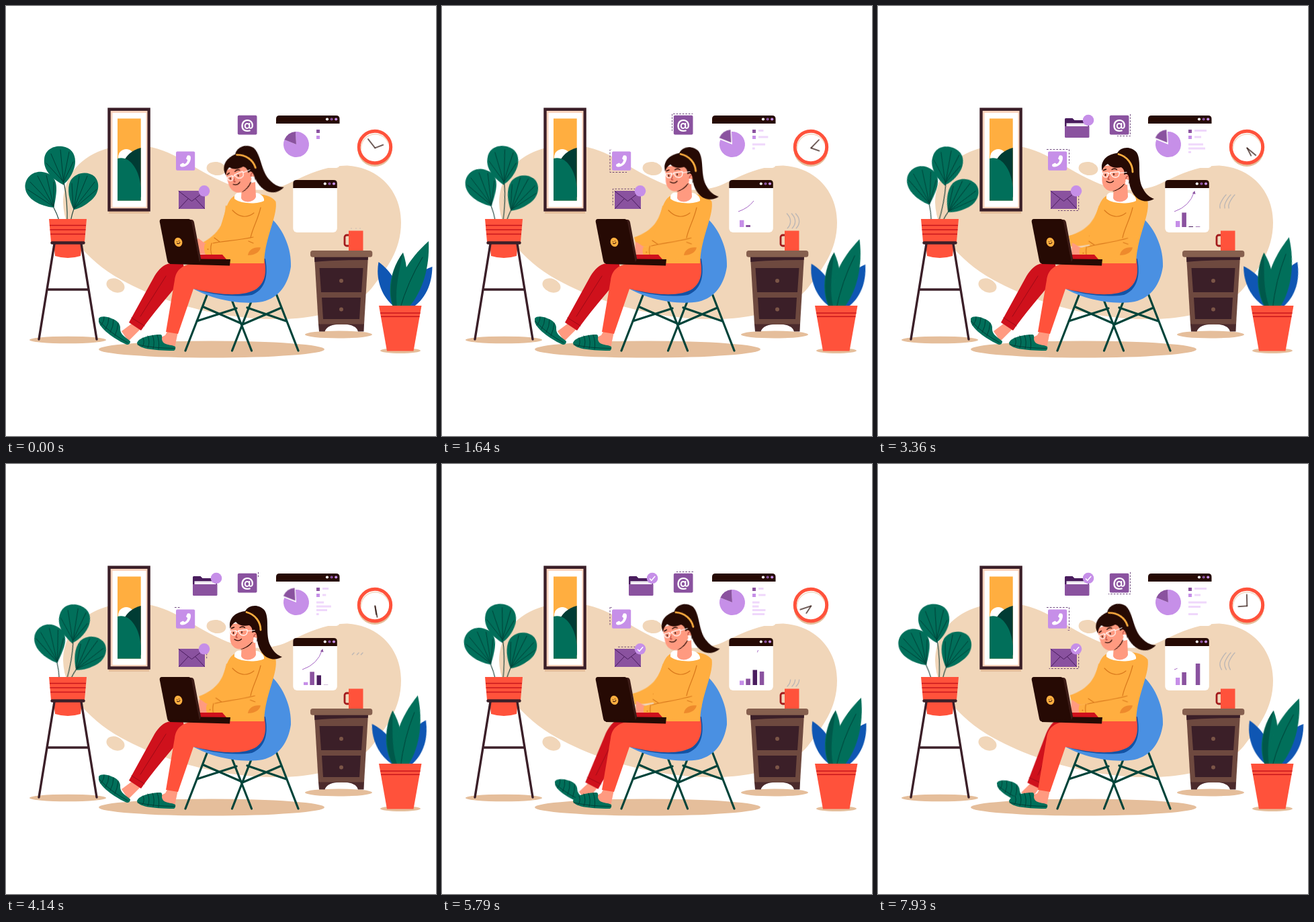
These frames come from a looping animation (640x640 px, 8 s). An HTML page without scripts:

```html
<!DOCTYPE html>
<html lang="en">
<head>
<meta charset="utf-8">
<title>Working from home</title>
<style>
html,body{margin:0;height:100%;overflow:hidden;background:#fff}
svg{display:block;width:100%;height:100%}
.red{fill:#ff523b}.crimson{fill:#cf111c}.green{fill:#016f5a}.blue{fill:#0f56b3}
.yellow{fill:#ffae40}.skin{fill:#ff9a80}.ink{fill:#260a04}.wood{fill:#3b1f28}
.violet{fill:#8a529f}.lilac{fill:#c68fe8}.plum{fill:#4a1d5e}.white{fill:#fff}
.sand{fill:#f1d6b9}.shade{fill:#e5be9b}
.line{fill:none;stroke-linecap:round;stroke-linejoin:round}
.vein{stroke:#003f36;stroke-width:1}
.fold{stroke:#d9791c;stroke-width:1.2}
.band{stroke:#c8161d;stroke-width:1.6}
.dash{fill:none;stroke:#4a1d5e;stroke-width:.8;stroke-dasharray:2 1.5}
.wipe{fill:none;stroke:#fff;stroke-width:5}

/* everything shares one 8 s cycle */
.sway,.head,.leg,.near,.far,.hand,.trim,.curve,.tip,.grow,.slice,.folder,.check{animation:8s linear infinite}
.sway{animation-name:sway;animation-timing-function:cubic-bezier(.37,0,.63,1)}
.head{animation-name:nod;animation-timing-function:ease-in-out;transform-origin:348px 265px}
.leg{animation-name:tuck;animation-timing-function:ease-in-out;transform-origin:250px 380px}
.near,.far{animation-name:type;animation-timing-function:cubic-bezier(.37,0,.63,1)}
.near{--to:translate(5px,1px) rotate(-4deg);--from:translate(0,0) rotate(0deg);--end:translate(3.7px,.7px) rotate(-3deg);transform-origin:378px 358px}
.far{--to:rotate(0deg);--from:rotate(-15deg);--end:rotate(-4deg);transform-origin:328px 305px}
.hand{animation-name:turn}
.trim{animation-name:trim}
.curve{animation-name:curve}
.tip{animation-name:tip}
.grow{animation-name:grow}
.slice{animation-name:pull;animation-timing-function:ease-in-out}
.folder{animation-name:appear}
.check{animation-name:tick;fill:none;stroke:#fff;stroke-width:1.5;stroke-dasharray:100 300}
.late{animation-name:tickLate}

@keyframes sway{
  0%,89.2%{transform:rotate(0deg)}
  44.2%{transform:rotate(var(--b))}
  89.2%{animation-timing-function:cubic-bezier(.33,0,.67,.33)}
  100%{transform:rotate(calc(var(--b)*.135))}
}
@keyframes nod{0%,10.5%,79%,100%{transform:translate(-1px,2px) rotate(-17deg)}25%,61.5%{transform:translate(0,0) rotate(0deg)}}
@keyframes tuck{0%,61%{transform:translate(0,0) rotate(0deg)}78%,100%{transform:translate(26px,-5px) rotate(-8deg)}}
@keyframes type{
  0%,30%,60%,90%{transform:var(--from)}
  15%,45%,75%{transform:var(--to)}
  100%{transform:var(--end)}
}
@keyframes turn{from{transform:rotate(var(--s))}to{transform:rotate(calc(var(--s) + var(--d)))}}
@keyframes trim{
  0%,7.5%{stroke-dasharray:0 300;stroke-dashoffset:0}
  12.5%,72.5%{stroke-dasharray:20 300;stroke-dashoffset:0}
  20%,80%{stroke-dasharray:42 300;stroke-dashoffset:0}
  23.9%,83.9%{stroke-dasharray:50 300;stroke-dashoffset:-4}
  27.6%,87.6%{stroke-dasharray:62 300;stroke-dashoffset:-12}
  35%,95%{stroke-dasharray:65 300;stroke-dashoffset:-35}
  42%{stroke-dasharray:40 300;stroke-dashoffset:-60}
  53.75%{stroke-dasharray:0 300;stroke-dashoffset:-100}
  67.5%{stroke-dasharray:0 300;stroke-dashoffset:0}
  100%{stroke-dasharray:47 300;stroke-dashoffset:-53}
}
@keyframes curve{
  0%,7%{stroke-dasharray:0 300;stroke-dashoffset:0}
  12.5%{stroke-dasharray:30 300;stroke-dashoffset:0}
  28%,53%{stroke-dasharray:100 300;stroke-dashoffset:0}
  60.75%{stroke-dasharray:65 300;stroke-dashoffset:-35}
  74%{stroke-dasharray:0 300;stroke-dashoffset:-100}
  96%{stroke-dasharray:0 300;stroke-dashoffset:0}
  100%{stroke-dasharray:14 300;stroke-dashoffset:0}
}
@keyframes tip{0%,26.5%,71%,100%{opacity:0}28%,69%{opacity:1}}
@keyframes grow{
  0%,7%{transform:scaleX(0)}
  12.5%{transform:scaleX(var(--a))}
  27.6%{transform:scaleX(var(--b))}
  42%{transform:scaleX(var(--c))}
  60.75%{transform:scaleX(var(--d))}
  83.9%{transform:scaleX(var(--e))}
  99.1%,100%{transform:scaleX(var(--f))}
}
@keyframes pull{0%,8%,59%,100%{transform:translate(0,0)}18%,50%{transform:translate(-1.6px,-2.8px)}}
@keyframes appear{0%,24%{opacity:0}29%,100%{opacity:1}}
@keyframes tick{0%,55%{stroke-dashoffset:100}60%,100%{stroke-dashoffset:0}}
@keyframes tickLate{0%,59.5%{stroke-dashoffset:100}64.5%,100%{stroke-dashoffset:0}}
</style>
</head>
<body>
<svg viewBox="0 0 640 640">
<defs>
  <path id="tickMark" d="M-4 .5L-1.2 3.3L4.2 -3" pathLength="100"/>
  <g id="dots"><circle class="white" r="2.1"/><circle class="violet" cx="6.7" r="2.1"/><circle class="lilac" cx="13.2" r="2.1"/></g>
  <path id="steam" class="line" d="M514 331C520 325 520 317 515 311S507 299 510 293S514 285 518 281" pathLength="100"/>
  <path id="atPath" d="M374 160.5H342.5V193.5H375.5V161" pathLength="100"/>
  <path id="callPath" d="M250 213V247.5H284.5V213.5H251" pathLength="100"/>
  <path id="mailPath" d="M288 272.3H254.3V304.5H298.7V282" pathLength="100"/>
  <mask id="atMask" maskUnits="userSpaceOnUse" x="0" y="0" width="640" height="640"><use href="#atPath" class="wipe trim"/></mask>
  <mask id="callMask" maskUnits="userSpaceOnUse" x="0" y="0" width="640" height="640"><use href="#callPath" class="wipe trim"/></mask>
  <mask id="mailMask" maskUnits="userSpaceOnUse" x="0" y="0" width="640" height="640"><use href="#mailPath" class="wipe trim"/></mask>
</defs>

<!-- backdrop -->
<path class="sand" d="M85 292C86 240 130 207 188 207C245 208 270 238 315 258C350 276 392 280 425 262C452 249 478 238 507 237.500C555 240 588 275 588 322C588 365 565 392 548 415C525 448 470 466 405 466C330 467 245 446 180 412C127 385 86 342 85 292Z"/>
<ellipse class="sand" cx="313" cy="242" rx="14.5" ry="10" transform="rotate(8 313 242)"/>
<ellipse class="sand" cx="163" cy="416" rx="14" ry="10" transform="rotate(22 163 416)"/>
<g class="shade">
  <ellipse cx="92" cy="497" rx="57" ry="5.3"/>
  <ellipse cx="306" cy="511" rx="168" ry="12.5"/>
  <ellipse cx="495" cy="489" rx="50" ry="5.5"/>
  <ellipse cx="587" cy="513" rx="30" ry="4"/>
  <path d="M153 304h60v5h-60z"/>
  <circle cx="549" cy="213.5" r="25.5"/>
</g>

<!-- tall plant -->
<g class="sway" style="--b:15.5deg;transform-origin:89px 318px">
  <path class="line" stroke="#24473f" stroke-width="1.2" d="M80 322Q76 309 70 298M91 324Q92 290 86 262M96 322Q98 309 102 300"/>
  <g class="green">
    <path d="M85 266C70 258 55 245 57 228C58 213 72 207 84 209C98 211 105 222 102.500 237C100 250 92 261 85 266Z"/>
    <path d="M71 300C52 298 30 288 28.500 270C28 254 42 245 54 247C70 249 76 260 75 275C74 288 72 296 71 300Z"/>
    <path d="M101 303C94 290 90 272 96 260C104 247 122 245 132 254C141 264 138 280 127 289C118 297 108 302 101 303Z"/>
  </g>
  <path class="line vein" d="M86 266L81 214M85 262L67 220M85 262L94 217M84 260L60 234M86 261L100 232M71 299L47 253M71 298L60 252M71 298L36 262M70 298L32 273M71 297L71 262M101 302L121 253M101 302L109 253M101 302L132 262M102 301L135 273M100 300L98 264"/>
</g>
<path class="red" d="M64 317h56l-3 34H67zM71 354h42l-2 18q-19 6-38 0z"/>
<path class="band" d="M65 326.500h54M65.500 333h53M66 339.500h52"/>
<g class="line" stroke="#3b1f28" stroke-width="3.4"><path d="M72 354L49 496M112 354L135 496M61 422H123"/><path d="M68.500 352.500H115.500" stroke-width="4.400"/></g>

<!-- picture -->
<path class="wood" d="M151.300 151.500h63.500v154.300h-63.500z"/>
<path fill="#fbd3bd" d="M155.700 156h54.800v145.300h-54.800z"/>
<path class="white" d="M158.500 159h50v140h-50z"/>
<path class="yellow" d="M166 167.500h34.700v122.300H166z"/>
<circle class="white" cx="179" cy="225" r="12"/>
<path fill="#003c34" d="M200.700 211C188 214 177 223 172 238L200.700 285Z"/>
<path class="green" d="M166 227C182 222 198 240 200.700 270V289.800H166Z"/>

<!-- wall clock -->
<circle cx="549" cy="210" r="23.700" fill="#fff" stroke="#ff523b" stroke-width="5"/>
<path class="line" d="M528.500 213A21 21 0 0 1 569 204" stroke="#f3d9c4" stroke-width="1.500"/>
<g transform="translate(549.300 211.300)" class="line" stroke="#260a04" stroke-width="1.300">
  <path class="hand" style="--s:-38deg;--d:400deg" d="M0 0V-17"/>
  <path class="hand" style="--s:69deg;--d:199deg" d="M0 0V-13"/>
</g>

<!-- pie window -->
<rect class="white" x="402" y="163" width="94.500" height="78" rx="5"/>
<path class="ink" d="M402 175v-7q0-5 5-5h84.500q5 0 5 5v7z"/>
<use href="#dots" x="478" y="168.500"/>
<path class="lilac" d="M432 206L431 187A19 19 0 1 1 414.300 199Z"/>
<path class="violet slice" d="M432 206L414.300 199A19 19 0 0 1 431 187Z"/>
<path class="violet" d="M462 184h5v5h-5z"/><path class="lilac" d="M462 193h5v5h-5z"/>
<g fill="#efd7fb">
  <g transform="translate(471 184)"><rect class="grow" style="--a:0;--b:14;--c:18;--d:1;--e:14;--f:18" width="1" height="3"/></g>
  <g transform="translate(471 193.500)"><rect class="grow" style="--a:8;--b:20;--c:10;--d:1;--e:20;--f:9" width="1" height="3"/></g>
  <g transform="translate(462 204.500)"><rect class="grow" style="--a:10;--b:27;--c:22;--d:1;--e:20;--f:27" width="1" height="3"/></g>
  <g transform="translate(462 210.500)"><rect class="grow" style="--a:0;--b:7;--c:25;--d:19;--e:0;--f:18" width="1" height="3"/></g>
  <g transform="translate(462 216)"><rect class="grow" style="--a:0;--b:0;--c:4;--d:27;--e:12;--f:0" width="1" height="3"/></g>
  <g transform="translate(462 222)"><rect class="grow" style="--a:0;--b:0;--c:0;--d:7;--e:29;--f:14" width="1" height="3"/></g>
</g>

<!-- bar window -->
<rect class="white" x="427.300" y="259" width="65.500" height="78" rx="6"/>
<path class="ink" d="M427.300 271v-7q0-5 5-5h55.500q5 0 5 5v7z"/>
<use href="#dots" x="474.800" y="264.500"/>
<g transform="translate(0 329) rotate(-90)">
  <rect class="lilac grow" style="--a:6;--b:14;--c:9;--d:0;--e:13;--f:11" y="443" width="1" height="6.400"/>
  <rect class="violet grow" style="--a:.7;--b:5;--c:21.500;--d:18;--e:1;--f:19" y="452.300" width="1" height="6.600"/>
  <rect class="plum grow" style="--a:0;--b:0;--c:1;--d:27;--e:18;--f:0" y="462.500" width="1" height="6.500"/>
  <rect class="violet grow" style="--a:0;--b:0;--c:.8;--d:0;--e:40;--f:32" y="472.800" width="1" height="6.500"/>
</g>
<path class="curve" d="M441 306Q464 298 470.500 277" pathLength="100" fill="none" stroke="#a566c4" stroke-width="1"/>
<path class="violet tip" d="M471.300 275L467.800 279L472.500 280Z"/>

<!-- floating icons -->
<use href="#atPath" class="dash" mask="url(#atMask)"/>
<rect class="violet" x="344.800" y="162.800" width="28.700" height="28.700" rx="2"/>
<text class="white" x="359.200" y="183.300" text-anchor="middle" font-family="Inter,sans-serif" font-weight="700" font-size="19">@</text>
<use href="#callPath" class="dash" mask="url(#callMask)"/>
<rect class="lilac" x="253" y="216.500" width="28.200" height="28.200" rx="2"/>
<path class="white" d="M270 222.500Q275 221 275 226C275 234 268 240 261.500 239.500Q258 239 259.500 235.500L263.500 233.500L266 235.300Q269.500 233 270.300 229.500L268 227Z"/>
<use href="#mailPath" class="dash" mask="url(#mailMask)"/>
<path class="violet" d="M257 275h39v27h-39z"/>
<path class="line" d="M257 275.500L276.500 290.500L296 275.500M257.500 301.500L271 287M295.500 301.500L282 287" stroke="#4a1d5e" stroke-width="1"/>
<circle class="lilac" cx="295" cy="275.300" r="8.300"/>
<g transform="translate(295 275.300)"><use href="#tickMark" class="check"/></g>
<g class="folder">
  <path class="plum" d="M278 168.500q0-1.500 1.500-1.500h10l3 3H314v12H278z"/>
  <path class="white" d="M280.500 174.500h32v6h-32z"/>
  <path d="M281 176.500h31" stroke="#c9b0d3" stroke-dasharray="1 1"/>
  <path class="violet" d="M278 179h36.500v15.500q0 1.500-1.500 1.500h-33.500q-1.500 0-1.500-1.500z"/>
  <circle class="lilac" cx="313" cy="170" r="8.300"/>
</g>
<g transform="translate(313 170)"><use href="#tickMark" class="check late"/></g>

<!-- nightstand and mug -->
<path fill="#6e493f" d="M459 372h80l-6 102h-68z"/>
<path class="wood" d="M459 373h80l-.4 5q-50 0-79.200 3zM466.500 390h65l-2.500 36h-60zM470 434h58l-2 32h-54z"/>
<path fill="#4b2a2c" d="M465 473.500h68l-.5 11h-8.500q-3-11-24.500-11t-25 11h-8.500z"/>
<rect x="453" y="364" width="92.300" height="9.800" rx="3.500" fill="#86604f"/>
<circle cx="499" cy="409" r="3" fill="#7b5547"/><circle cx="499" cy="451.500" r="3" fill="#7b5547"/>
<rect x="504" y="341" width="10" height="16" rx="3" fill="none" stroke="#a31b1c" stroke-width="2.800"/>
<path class="red" d="M510 334.500h21.500v29.500h-21.500z"/>
<g fill="none" stroke="#bdb7b5" stroke-width="1.400">
  <use href="#steam" class="trim"/><use href="#steam" class="trim" x="7"/><use href="#steam" class="trim" x="13"/>
</g>

<!-- low plant -->
<g class="sway" style="--b:-9.600deg;transform-origin:587px 446px">
  <path class="blue" d="M582 450C562 438 549 410 554.500 381C575 396 590 420 586 450Z"/>
  <path class="blue" d="M600 450C594 425 606 397 634.500 388C634 415 624 437 603 450Z"/>
</g>
<g class="sway" style="--b:-12deg;transform-origin:583px 446px">
  <path class="green" d="M578 452C565 427 573 390 591 367C597 385 598 400 594 414L590 452Z"/>
  <path fill="#00584a" d="M578 452C567 427 574 390 591 367C586 392 577 425 583 452Z"/>
</g>
<g class="sway" style="--b:-10deg;transform-origin:587px 446px">
  <path class="green" d="M584 452C577 420 590 385 629 350C631 388 620 428 596 452Z"/>
  <path class="line vein" d="M586 452Q598 410 620 374"/>
</g>
<path class="red" d="M555 446h63.500l-12 67.500H567z"/>
<path class="band" d="M557 457h59.500M558 462.300h57.500"/>

<!-- chair -->
<path class="line" stroke="#00443a" stroke-width="3.200" d="M300 428L267 513M365 440L336.500 513M337 440L365.500 513M402 428L435 513M294 448L349 472M284 469L343 450M359 449L417 469M352 474L410 449"/>
<path fill="#4a90e2" d="M394 315C414 334 425 362 424 388C420 414 407 434 382 440C350 446 300 436 271 416L300 395L380 380Z"/>
<path fill="#1353a5" d="M386 376C391 404 385 422 366 430C340 434 300 430 274 418L300 395Z"/>

<!-- legs -->
<g class="leg">
  <path class="skin" d="M188 472L172 484L182 499L200 481Z"/>
  <path class="green" d="M138 465C141 461 150 462 157 465C166 468 171 474 170 481C170 489 178 493 185 499Q185 504 180 504C165 498 141 482 138 470Z"/>
  <path class="line vein" d="M146 463Q146 470 141 475M153 464Q153 473 148 481M160 467Q160 477 155 486M167 472Q166 482 162 491M138.500 469Q158 489 181 501"/>
  <path class="crimson" d="M262 378L244 383C234 385 228 391 221 402L183 471L201 483C217 460 242 430 268 400Z"/>
  <path class="line" stroke="#9e0a16" stroke-width="1" d="M187 464L206 476M200 462L238 402"/>
</g>
<path class="skin" d="M241 483L237 490L231 493L235 509H251L256 485Z"/>
<path class="green" d="M252 507C245 503 234 506 232 496Q233 489 230 489C215 489 196 494 195 502C197 509 215 513 250 513Q253 511 252 507Z"/>
<path class="line vein" d="M204 494Q207 501 203 507M211 491Q215 500 211 509M218 490Q222 500 219 510M225 489.500Q229 500 227 511M196 504Q220 509.500 251 509.500"/>
<path class="red" d="M384 374C388 395 387 410 373 421C355 432 325 432 279 421L256 488L238 485L251 408C253 393 262 385 280 383L330 378Z"/>

<!-- upper body -->
<g class="far"><path class="yellow" d="M329 297C322 318 313 333 283 341L286 357C305 357 325 354 340 345L345 305Z"/><path class="line fold" d="M314 342L320 349"/></g>
<path class="yellow" d="M341 282C333 286 330 294 327 303L319 330L312 350L330 383H384C385 360 390 345 396 325C400 312 403 300 401.500 291C396 283 384 280 370 280Z"/>
<path class="line fold" d="M337 304C347 315 359 316 369 308M379 300C375 318 367 330 364 345"/>
<g class="near">
  <path class="skin" d="M299 354C292 352 289 346 285 346L283 362L289 369L300 370Z"/>
  <path class="yellow" d="M385 338C375 349 345 345 296 354Q293 363 298 372C325 377 360 377 381 363Z"/>
  <path class="line fold" d="M368 344C345 349 320 350 308 353M306 353Q303 363 307 373M310 345L318 351M361 350L368 353"/>
  <circle cx="300.500" cy="362" r="1" fill="#d9791c"/>
</g>
<path fill="#ee8a2c" d="M360 371C361 362 370 358 379 359.500C377 367 370 371 360 371Z"/>
<path class="white" d="M340 283C342 277 349 276 354 280L372 278C380 279 385 285 384 290C375 295 350 295 340 287Z"/>
<path class="skin" d="M351 266L371 262L372 284C369 293 353 294 350 286Z"/>

<!-- laptop -->
<path class="crimson" d="M285 370H322L328 377H285Z"/>
<path fill="#3d1c17" d="M268 317.500L276 318Q279 318 280 322L291 381H275Z"/>
<path class="ink" d="M232 317H272Q275 317.500 276 321L288 382L243 383Q241 383 240 379L228.700 321Q228.500 317 232 317Z"/>
<path class="ink" d="M242 380L288 381L290 376.500L334 377L333 386.500L244 384Z"/>
<g transform="translate(256.500 351.500) rotate(-20)">
  <ellipse class="yellow" rx="5.800" ry="6.800"/>
  <path class="line" stroke="#260a04" stroke-width="1" d="M-1.500-1.500v.4M1.500-1.500v.4M-2.300 1Q0 3.500 2.300 1"/>
</g>

<!-- head -->
<g class="head">
  <path class="ink" d="M356 219C361 209 377 208 385 218C393 231 385 254 394 271C399 281 405 285 411 287C400 294 382 292 375 268C371 250 380 235 368 222Z"/>
  <path class="ink" d="M349 276Q361 274 367 265L360 265Z"/>
  <path class="skin" d="M334 238L333.500 260C334 270 341 276 349 275.500C358 273 364 268 368 262L374 254L370 236Z"/>
  <circle class="skin" cx="370.500" cy="255" r="4.500"/>
  <path class="ink" d="M333.500 245C330 229 343 219 359 219C376 221 384 238 378 256L373 265Q375 252 370 250L366 251Q368 244 362 240C354 242 346 240 342 235Q336 238 333.500 245Z"/>
  <path class="line" stroke="#ffae40" stroke-width="2.800" d="M358 220.500C371 224 379 235 379 247"/>
  <path class="line" stroke="#260a04" stroke-width="1.400" d="M335.500 244.500l4-1.500M348 243.500q4-2.500 7.500 0M338.500 250.500v2M351 249.500v2"/>
  <path class="line" stroke="#fff" stroke-width="1.200" d="M334 248.500l8.500-.5q.5 7-3.500 7t-5-6.500zM346 247.800l13-1.200q1 8-5 8.500t-8-7.300zM342.500 249.500l3.500-.5M359 248.500l11-1"/>
  <path class="line" stroke="#a8302c" stroke-width="1" d="M344 253l-2 5h2.500M369 257q0-4 3.500-4"/>
  <path class="line" stroke="#260a04" stroke-width="1.200" d="M340 261Q346 265 350.500 260.500"/>
  <circle class="white" cx="370" cy="259.500" r="1.800"/><ellipse class="white" cx="370" cy="263.500" rx="2" ry="2.800"/>
</g>
</svg>
</body>
</html>
```
